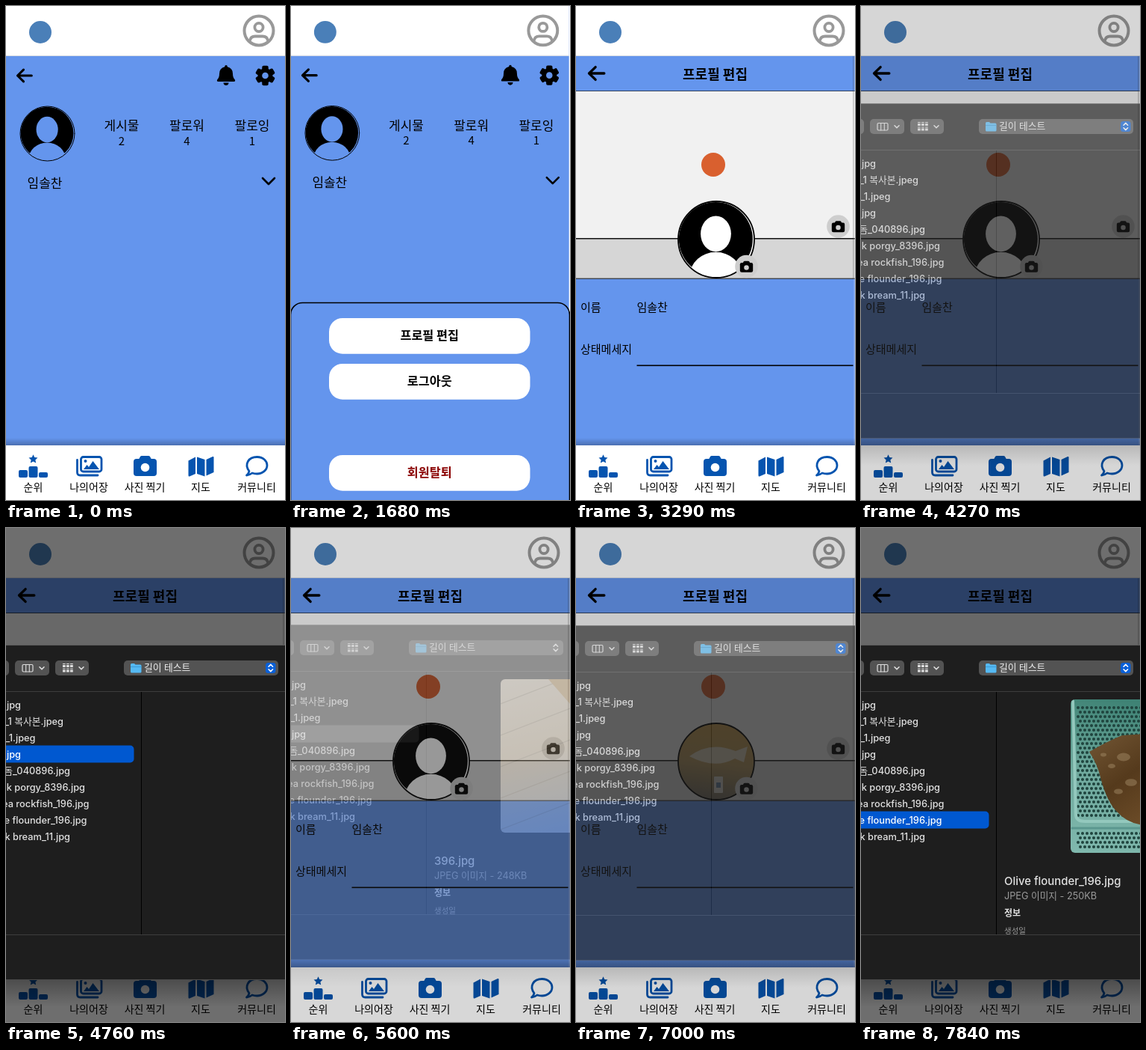
Recreate the animation shown at these times as an HTML page with a canvas. Size 374 by 660 pixels, loop 8 s.

```html
<!DOCTYPE html>
<html lang="ko">
<head>
<meta charset="utf-8">
<title>프로필 편집</title>
<style>
html, body { margin: 0; width: 100%; height: 100%; overflow: hidden; background: #fff; }
canvas { display: block; }
</style>
</head>
<body>
<canvas id="stage" width="374" height="660"></canvas>
<script>
const W = 374, H = 660, LOOP = 8000, STEP = 70;
const SKY = '#6495ed', NAVY = '#0554af', USER = '임솔찬';
const KO = '"Noto Sans CJK KR", "Noto Sans CJK", sans-serif';
const UI = 'Inter, "Noto Sans CJK KR", "Noto Sans CJK", sans-serif';
const FILES = [['.jpg', 20], ['_1 복사본.jpeg', 77], ['_1.jpeg', 39.5], ['.jpg', 20], ['돔_040896.jpg', 86],
  ['Black porgy_8396.jpg', 106], ['Sea rockfish_196.jpg', 111.5], ['Olive flounder_196.jpg', 108.5], ['Black bream_11.jpg', 86]];

const screen = document.getElementById('stage').getContext('2d');
const buffer = document.createElement('canvas');
buffer.width = W; buffer.height = H;
const back = buffer.getContext('2d');
let c = screen;

// ---- helpers ----
function rect(x, y, w, h, fill) { c.fillStyle = fill; c.fillRect(x, y, w, h); }

function box(x, y, w, h, r, fill) {
  c.beginPath(); c.roundRect(x, y, w, h, r);
  c.fillStyle = fill; c.fill();
}

function oval(x, y, rx, ry, fill) {
  c.beginPath(); c.ellipse(x, y, rx, ry, 0, 0, 7);
  c.fillStyle = fill; c.fill();
}

function ring(x, y, r, width, color) {
  c.beginPath(); c.arc(x, y, r, 0, 7);
  c.lineWidth = width; c.strokeStyle = color; c.stroke();
}

function line(path, width, color) {
  c.lineWidth = width; c.strokeStyle = color;
  c.lineCap = c.lineJoin = 'round';
  c.stroke(new Path2D(path));
}

function shape(path, fill) { c.fillStyle = fill; c.fill(new Path2D(path)); }

function blend(x0, y0, x1, y1, ...colors) {
  const g = c.createLinearGradient(x0, y0, x1, y1);
  colors.forEach((color, i) => g.addColorStop(i / (colors.length - 1), color));
  return g;
}

// y is the visual middle of the line
function text(s, x, y, size, { color = '#000', align = 'center', weight = 400, font = KO } = {}) {
  c.font = `${weight} ${size}px ${font}`;
  c.textAlign = align;
  c.fillStyle = color;
  c.fillText(s, x, y + size * 0.37);
}

function layer(draw, alpha, dy = 0) {
  back.clearRect(0, 0, W, H);
  c = back; draw(); c = screen;
  c.globalAlpha = alpha;
  c.drawImage(buffer, 0, dy);
  c.globalAlpha = 1;
}

function at(x, y, scale, draw) {
  c.save(); c.translate(x, y); c.scale(scale, scale); draw(); c.restore();
}

// ---- app icons ----
function camera(x, y, scale, color, lens) {
  at(x, y, scale, () => {
    box(-15.5, -9.5, 31, 23, 4, color);
    shape('M-9 -8L-6.5 -12.5Q-6 -13.5 -4.5 -13.5H4.5Q6 -13.5 6.5 -12.5L9 -8Z', color);
    oval(0, 2, 5.8, 5.8, lens);
  });
}

function gear(x, y) {
  at(x, y, 1, () => {
    for (let i = 0; i < 6; i++) {
      c.save(); c.rotate(i * Math.PI / 3);
      box(-4.2, -13.2, 8.4, 10, 2, '#000');
      c.restore();
    }
    oval(0, 0, 10, 10, '#000');
    oval(0, 0, 4.3, 4.3, SKY);
  });
}

function bell(x, y) {
  at(x, y, 1, () => {
    shape('M0 -13.5Q1.8 -13.5 1.8 -11.2Q9 -9.5 9 -2Q9 3 11.7 5.8Q13 8.3 10.5 8.5H-10.5Q-13 8.3 -11.7 5.8Q-9 3 -9 -2Q-9 -9.5 -1.8 -11.2Q-1.8 -13.5 0 -13.5Z', '#000');
    shape('M-3.6 10H3.6Q3 13.6 0 13.6Q-3 13.6 -3.6 10Z', '#000');
  });
}

function star(x, y, r) {
  c.beginPath();
  for (let i = 0; i < 10; i++) {
    const a = i * Math.PI / 5 - Math.PI / 2, d = i % 2 ? r * 0.48 : r;
    c.lineTo(x + d * Math.cos(a), y + d * Math.sin(a));
  }
  c.fillStyle = NAVY; c.fill();
}

function backArrow(x, y, s) {
  at(x, y, s, () => line('M18.8 0H0M8 -7.8L0 0L8 7.8', 3.1, '#000'));
}

// ---- app parts ----
function topBar() {
  rect(0, 0, W, 67, '#fff');
  rect(0, 66, W, 1, '#d8dce4');
  oval(46, 35, 15, 15, '#4a7fb8');
  ring(339, 33, 19.5, 4, '#999');
  ring(339, 28.5, 5.6, 3.8, '#999');
  line('M327 46Q328 40.5 334 40.5H344Q350 40.5 351 46', 3.8, '#999');
}

function navBar() {
  rect(0, 577, W, 10, blend(0, 577, 0, 587, 'rgba(0,0,0,0)', 'rgba(0,0,0,.25)'));
  rect(0, 587, W, 73, '#fff');

  star(36.5, 605.5, 6.3);
  box(30.5, 615, 12, 15, 2, NAVY);
  box(17, 620, 12, 10, 2, NAVY);
  box(44, 623, 12, 7, 2, NAVY);

  line('M95.5 606.5V623Q95.5 627 99.5 627H123', 2.8, NAVY);
  c.beginPath(); c.roundRect(100.5, 602.5, 27.5, 19.5, 3); c.stroke();
  oval(106.5, 608, 2, 2, NAVY);
  shape('M104 619L108.5 613L111 616L116.5 608L125 619Z', NAVY);

  camera(186.5, 614.5, 1, NAVY, '#fff');

  shape('M244.5 607.5L254 602.5V625L246 628.5Q244.5 629 244.5 627Z', NAVY);
  shape('M256 602.5L266.5 606V628.5L256 625Z', NAVY);
  shape('M268.5 606L277 602Q278.5 601.5 278.5 603V623L268.5 627.5Z', NAVY);

  line('M326 621.5C319 612 325 602.5 336.5 602.5C345 602.5 350 608 350 613.5C350 620 344 625 336.5 625Q333 625 330 624Q326 627 322.5 627Q325.5 624.5 326 621.5Z', 2.8, NAVY);

  [['순위', 36.5], ['나의어장', 111], ['사진 찍기', 186], ['지도', 261], ['커뮤니티', 336]]
    .forEach(([s, x]) => text(s, x, 643, 14));
}

function silhouette(x, y, r, paper, edge) {
  oval(x, y, r, r, paper);
  c.save();
  c.beginPath(); c.arc(x, y, r, 0, 7); c.clip();
  oval(x - r * 0.012, y - r * 0.012, r * 0.97, r * 0.97, '#000');
  oval(x - r * 0.01, y - r * 0.15, r * 0.4, r * 0.47, paper);
  oval(x - r * 0.01, y + r * 0.94, r * 0.68, r * 0.61, paper);
  c.restore();
  ring(x, y, r, edge, '#000');
}

function photoAvatar() {
  c.save();
  c.beginPath(); c.arc(188, 312, 51, 0, 7); c.clip();
  rect(137, 261, 102, 102, blend(190, 262, 178, 364, '#c49a4c', '#b3955c', '#6f6a60'));
  shape('M152 305Q180 284 214 298L230 292L225 313L213 308Q186 323 152 305Z', '#d3c8b4');
  box(185, 332, 12, 22, 1, '#c9c7c0');
  rect(188, 340, 6, 7, '#5d7797');
  c.restore();
  ring(188, 312, 51, 1.8, '#000');
}

function badge(x, y) {
  oval(x, y, 15.3, 15.3, '#cecece');
  camera(x, y + 0.3, 0.56, '#000', '#cecece');
}

// ---- pages ----
function home() {
  rect(0, 0, W, H, SKY);
  topBar();
  backArrow(15.5, 93, 1);
  bell(295, 92.5);
  gear(347.5, 93);
  silhouette(55.5, 170.5, 36.5, SKY, 1);
  [['게시물', 2, 155], ['팔로워', 4, 242.5], ['팔로잉', 1, 330]].forEach(([s, n, x]) => {
    text(s, x, 160, 17);
    text(n, x, 180, 15);
  });
  text(USER, 52, 237, 17);
  line('M344 230L352 238L360 230', 2.6, '#000');
  navBar();
}

function drawer(pressed) {
  rect(0, 0, W, H, '#fff');
  c.save(); c.scale(0.9965, 0.996); home(); c.restore();
  c.beginPath(); c.roundRect(-0.5, 396.5, 374, 300, 16);
  c.fillStyle = SKY; c.fill();
  c.lineWidth = 1.6; c.strokeStyle = '#000'; c.stroke();
  if (pressed) box(53, 419, 270, 48, 18, 'rgba(0,0,0,.3)');
  [['프로필 편집', 417, '#000'], ['로그아웃', 478, '#000'], ['회원탈퇴', 600, '#8b0000']].forEach(([s, y, color], i) => {
    box(51, y, 269.5, 47.7, 18, pressed && i === 0 ? '#f0f0f0' : '#fff');
    text(s, 185.7, y + 22.5, 16.3, { color, weight: 700 });
  });
}

function edit(withPhoto) {
  rect(0, 0, W, H, SKY);
  topBar();
  backArrow(17.5, 90, 1.08);
  text('프로필 편집', 186.5, 91.5, 18, { weight: 700 });
  rect(0, 113, W, 1, '#34445f');
  rect(0, 114, W, 196, '#f1f1f1');
  rect(0, 311, W, 53, '#d6d6d6');
  rect(0, 310, W, 1.5, '#111');
  rect(0, 363.6, W, 1.2, '#333');
  rect(371.5, 67, 1, 298, 'rgba(0,0,0,.35)');
  rect(372.5, 67, 1.5, 520, 'rgba(255,255,255,.3)');
  oval(184, 212, 16, 16, '#d9602f');
  if (withPhoto) photoAvatar(); else silhouette(188, 312, 51, '#fff', 1.8);
  badge(351.5, 294.5);
  badge(228.5, 348);
  const left = { align: 'left' };
  text('이름', 6, 402, 15, left);
  text(USER, 81.5, 402, 15, left);
  text('상태메세지', 6, 458.5, 15, left);
  rect(81.5, 479.5, 290, 1.6, '#000');
  navBar();
}

// ---- file dialog ----
function woodPhoto() {
  rect(281, 229, 93, 205, blend(281, 229, 330, 434, '#d2c6b2', '#c1ad8d', '#8f98a6'));
  for (let i = 0; i < 5; i++) line(`M281 ${262 + i * 42}L374 ${226 + i * 42}`, 1.2, 'rgba(110,95,75,.45)');
  shape('M345 229H374V262Z', '#b58d52');
}

function trayPhoto() {
  rect(281, 229, 93, 205, blend(340, 229, 300, 434, '#3f8375', '#6fa99d', '#7fb8ad'));
  for (let y = 240; y < 432; y += 6)
    for (let x = 291 + (y / 6 % 2) * 3; x < 376; x += 6)
      if (y < 386 || y > 404) oval(x, y, 2, 2, '#1f443e');
  line('M284 231L288 384Q289 392 300 392H380', 4, '#93c8bd');
  line('M283 401H380', 3, '#5b978f');
  shape('M306 299Q330 285 350 277L380 275V397Q357 395 343 379Q330 366 322 337Q317 315 306 299Z',
    blend(310, 290, 380, 390, '#6d5130', '#553a1c', '#6b4b27'));
  [[352, 306, 9], [336, 318, 5], [362, 340, 8], [345, 352, 6], [325, 303, 4]]
    .forEach(([x, y, r]) => oval(x, y, r, r * 0.6, 'rgba(160,135,100,.5)'));
}

function preview(file) {
  const o = { align: 'left', font: UI };
  text(file.title, 192, 471, 14.9, { ...o, color: '#e2e2e2', weight: 500 });
  text(`JPEG 이미지 - ${file.size}KB`, 192, 491.5, 12.7, { ...o, color: '#9a9a9a' });
  text('정보', 192, 515, 12, { ...o, color: '#e2e2e2', weight: 700 });
  text('생성일', 192, 538, 10.5, { ...o, color: '#9a9a9a' });
  if (!file.image) return;
  c.save();
  c.beginPath(); c.roundRect(281, 229, 150, 205, 6); c.clip();
  file.image();
  c.restore();
}

function dialog({ row, file, active }) {
  rect(0, 157, W, 447, '#1e1e1e');
  rect(0, 156, W, 1, '#5a5a5a');
  rect(0, 603, W, 1, '#4a4a4a');
  rect(0, 218, W, 1, '#3d3d3d');
  rect(0, 543, W, 1, '#3d3d3d');
  rect(181, 219, 1, 324, '#000');

  const key = '#535353', ink = '#dedede';
  [[-20, 24], [12, 46], [66, 45], [158, 207]].forEach(([x, w]) => box(x, 177, w, 20, 5, key));
  c.beginPath(); c.roundRect(22, 182.5, 14, 9.5, 1.5);
  c.lineWidth = 1.2; c.strokeStyle = ink; c.stroke();
  line('M26.7 183V192M31.3 183V192', 1.1, ink);
  for (let i = 0; i < 6; i++) {
    const x = 76 + i % 3 * 5, y = i < 3 ? 181 : 187.5;
    rect(x, y, 3.8, 1, ink);
    rect(x, y + 2, 3.8, 3, ink);
  }
  line('M45 185.8L48 188.8L51 185.8M98 185.8L101 188.8L104 185.8', 1.6, ink);
  shape('M167 182.5Q167 181 168.5 181H172L173.5 182.5H180Q181.5 182.5 181.5 184V192Q181.5 193.5 180 193.5H168.5Q167 193.5 167 192Z', '#55b9f3');
  rect(167, 185, 14.5, 0.8, '#3593cf');
  text('길이 테스트', 185, 186.2, 12.8, { color: '#eee', align: 'left', font: UI, weight: 500 });
  if (active) box(348, 180, 13.5, 14, 3.5, '#0a60d8');
  line('M352 185.2L354.8 182.4L357.6 185.2M352 188.8L354.8 191.6L357.6 188.8', 1.5, '#fff');

  if (row >= 0) box(-10, 290.5 + (row - 3) * 22, 181.5, 23, 5, active ? '#0058d0' : '#4a4a4a');
  FILES.forEach(([s, end], i) => text(s, end, 236 + i * 22, 12.8,
    { color: i === row ? '#fff' : '#e0e0e0', align: 'right', font: UI, weight: 500 }));
  if (file) preview(file);
}

// ---- timeline ----
const smooth = u => u * u * (3 - 2 * u);

function picked(t, start, row, title, size, image) {
  if (t < start) return { row: -1 };
  const file = t < start + 140 ? null : { title, size, image: t < start + 210 ? null : image };
  return { row, file };
}

function sheet(t) {
  if (t >= 4270 && t < 5740) {
    const state = picked(t, 4760, 3, '396.jpg', 248, woodPhoto);
    return t < 5460 ? opening(t - 4270, state) : closing(t - 5390, state);
  }
  if (t >= 7000) return opening(t - 7000, picked(t, 7630, 7, 'Olive flounder_196.jpg', 250, trayPhoto));
}

function opening(ms, state) {
  const u = Math.min(1, (ms + STEP) / 350);
  return { ...state, active: true, dim: 0.57 * (1 - (1 - u) ** 1.5), alpha: 1 - (1 - u) ** 4.5, dy: -29 * (1 - smooth(u)) };
}

function closing(ms, state) {
  const v = 1 - ms / 350;
  return { ...state, active: false, dim: 0.57 * v ** 1.4, alpha: v ** 1.2, dy: -27.5 * (1 - v ** 4) };
}

function drawSheet(s) {
  rect(0, 0, W, H, `rgba(0,0,0,${s.dim})`);
  const dy = Math.round(s.dy), foot = 604 + dy;
  rect(0, foot, W, 36, blend(0, foot, 0, foot + 36, `rgba(0,0,0,${0.3 * s.alpha})`, 'rgba(0,0,0,0)'));
  layer(() => dialog(s), s.alpha, dy);
}

function render(ms) {
  const t = Math.floor((ms % LOOP) / STEP) * STEP;
  c = screen;
  if (t < 1680) return home();
  if (t < 3290) {
    drawer(t >= 2800);
    if (t >= 2940) layer(() => edit(false), 1 - (1 - (t - 2870) / 420) ** 2);
    return;
  }
  edit(t >= 5810);
  const s = sheet(t);
  if (s) drawSheet(s);
}

const begin = performance.now();
function tick() {
  render(performance.now() - begin);
  requestAnimationFrame(tick);
}
tick();
</script>
</body>
</html>
```
